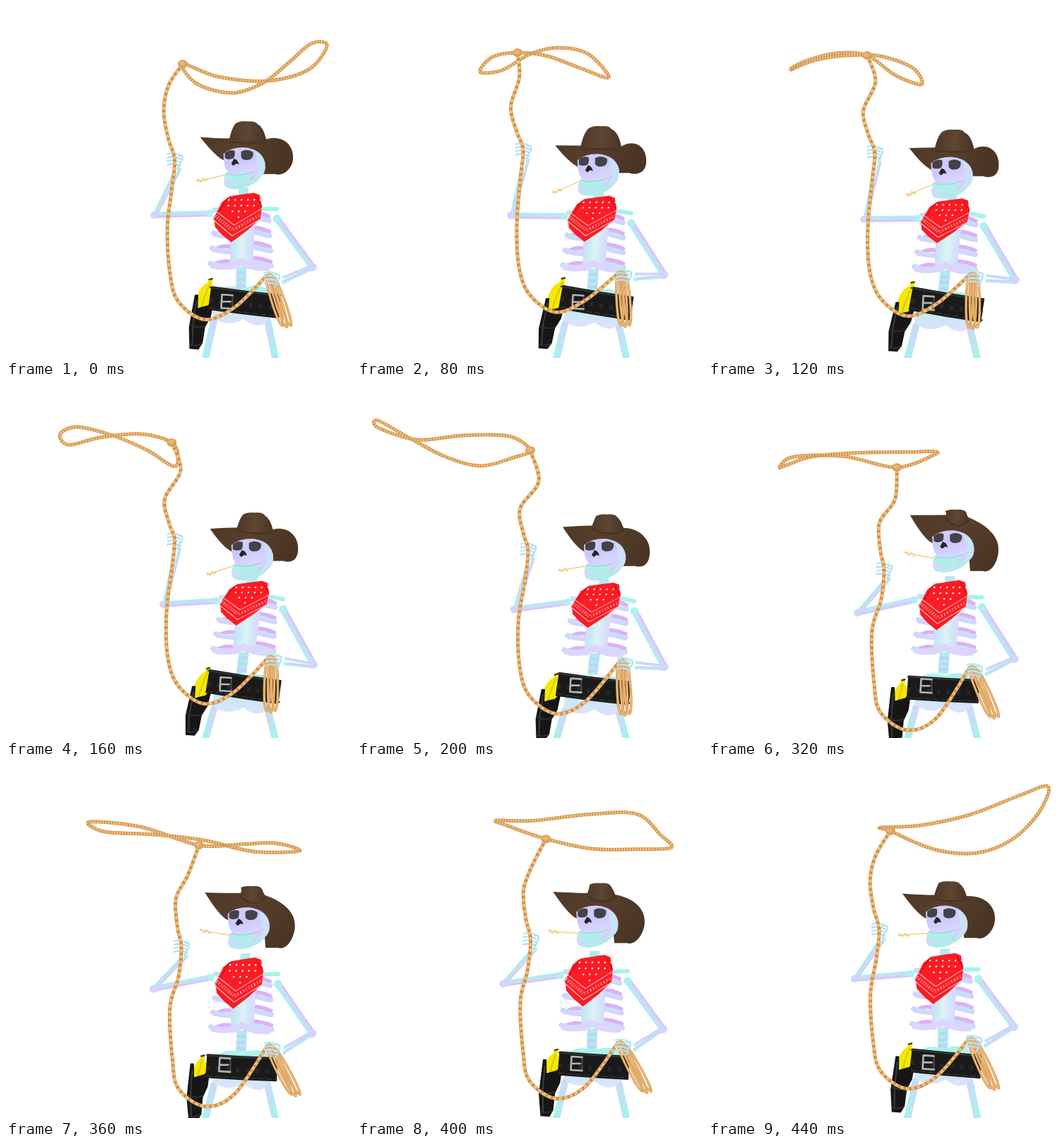
An HTML page with a canvas that plays this animation: 488 px wide and 498 px high, repeating every 0.48 s.

```html
<!DOCTYPE html>
<html lang="en">
<head>
<meta charset="utf-8">
<title>Skeleton cowboy with a lasso</title>
<style>
html, body { margin: 0; width: 100%; height: 100%; overflow: hidden; background: #fff; }
canvas { display: block; }
</style>
</head>
<body>
<canvas id="stage" width="488" height="498"></canvas>
<script>
const ctx = document.getElementById('stage').getContext('2d');
const LOOP = 480, STEP = 40;
const CYAN = '#a4f4ea', LAVENDER = '#d3d5fd', VIOLET = '#dcb0f8';
let t = 0;

// Lasso ring: ten points along the rope, starting at the knot, per key time.
const ringTimes = [0, 80, 120, 200, 280, 360, 440];
const rings = [
  [250,82, 270,110, 320,123, 365,108, 400,80, 432,53, 454,56, 428,90, 370,106, 300,100],
  [227,66, 192,72, 174,93, 205,91, 245,68, 285,59, 327,68, 356,101, 316,88, 270,71],
  [225,70, 180,67, 135,79, 117,90, 150,77, 195,70, 245,71, 290,88, 302,111, 265,98],
  [245,91, 215,71, 150,70, 85,76, 30,59, 30,49, 75,74, 125,100, 175,113, 222,101],
  [258,113, 302,81, 240,77, 150,66, 80,61, 36,82, 45,115, 95,130, 150,121, 205,112],
  [273,112, 330,111, 380,109, 415,120, 350,121, 280,105, 210,97, 140,93, 118,79, 190,86],
  [258,92, 320,118, 380,123, 430,104, 468,66, 481,29, 440,42, 370,69, 300,84, 245,87]
];

const wave = (mean, amp, peak) => mean + amp * Math.cos(2 * Math.PI * (t - peak) / LOOP);
const sway = (x, ax, px, y, ay, py) => [wave(x, ax, px), wave(y, ay, py)];
const add = ([x, y], dx, dy) => [x + dx, y + dy];

// Periodic Hermite interpolation of the ring keys.
function ringAt(time) {
  const n = rings.length;
  const when = k => ringTimes[(k + n) % n] + LOOP * Math.floor(k / n);
  const key = k => rings[(k + n) % n];
  let k = n - 1;
  while (ringTimes[k] > time) k--;
  const span = when(k + 1) - when(k), u = (time - when(k)) / span;
  const values = key(k).map((a, i) => {
    const b = key(k + 1)[i];
    const va = (b - key(k - 1)[i]) / (when(k + 1) - when(k - 1)) * span;
    const vb = (key(k + 2)[i] - a) / (when(k + 2) - when(k)) * span;
    return a + u * (va + u * (3 * (b - a) - 2 * va - vb + u * (2 * (a - b) + va + vb)));
  });
  return Array.from({ length: 10 }, (_, i) => [values[2 * i], values[2 * i + 1]]);
}

function smooth(pts, closed) {
  const n = pts.length;
  const at = i => closed ? pts[(i + n) % n] : pts[Math.max(0, Math.min(n - 1, i))];
  const path = new Path2D();
  path.moveTo(...pts[0]);
  for (let i = 0; i < (closed ? n : n - 1); i++) {
    const [a, b, c, d] = [at(i - 1), at(i), at(i + 1), at(i + 2)];
    path.bezierCurveTo(b[0] + (c[0] - a[0]) / 6, b[1] + (c[1] - a[1]) / 6,
      c[0] - (d[0] - b[0]) / 6, c[1] - (d[1] - b[1]) / 6, ...c);
  }
  return path;
}

function stroke(path, color, width, dash = [], cap = 'round') {
  ctx.strokeStyle = color;
  ctx.lineWidth = width;
  ctx.lineCap = cap;
  ctx.lineJoin = 'round';
  ctx.setLineDash(dash);
  ctx.stroke(typeof path === 'string' ? new Path2D(path) : path);
}

function fill(path, color) {
  ctx.fillStyle = color;
  ctx.fill(typeof path === 'string' ? new Path2D(path) : path);
}

function oval(x, y, rx, ry, color, angle = 0) {
  ctx.beginPath();
  ctx.ellipse(x, y, rx, ry, angle, 0, 7);
  ctx.fillStyle = color;
  ctx.fill();
}

const line = (...pts) => 'M' + pts.map(p => p.join()).join('L');

function gradient(a, b, ...colors) {
  const g = ctx.createLinearGradient(...a, ...b);
  colors.forEach((c, i) => g.addColorStop(i / (colors.length - 1), c));
  return g;
}

// Draws in a space sheared so that (0,0) is the top and (0,height) the bottom.
function between(top, bottom, height, draw) {
  ctx.save();
  ctx.transform(1, 0, (bottom[0] - top[0]) / height, (bottom[1] - top[1]) / height, ...top);
  draw();
  ctx.restore();
}

function bone(a, b, width) {
  const dx = b[0] - a[0], dy = b[1] - a[1], k = width / 2 / Math.hypot(dx, dy);
  const shade = gradient(add(a, dy * k, -dx * k), add(a, -dy * k, dx * k), CYAN, '#c9def8', '#e0b9fb');
  stroke(line(a, b), shade, width);
  oval(...a, width * .62, width * .62, LAVENDER);
  oval(...b, width * .62, width * .62, '#b2eff0');
}

function rope(path, dash, width = 5) {
  stroke(path, '#dc9f57', width);
  stroke(path, '#f0c182', width - 1.5);
  stroke(path, '#c88f4c', width - .5, dash, 'butt');
}

function drawTorso(neck, waist, drop) {
  stroke(`M294 ${445 + drop}L281 503`, gradient([280, 0], [296, 0], CYAN, LAVENDER), 10);
  stroke(`M370 ${445 + drop}L382 503`, gradient([367, 0], [383, 0], LAVENDER, CYAN), 10);
  fill(`M298 ${404 + drop}Q312 ${391 + drop} 334 ${400 + drop}Q358 ${390 + drop} 372 ${403 + drop}L374 ${440 + drop}
    Q360 ${462 + drop} 336 ${443 + drop}Q312 ${456 + drop} 292 ${440 + drop}Z`,
    gradient([0, 395 + drop], [0, 455 + drop], CYAN, '#e2e0ff'));
  between(neck, waist, 120, () => {
    stroke('M0 -6V26', '#b4e9ef', 14, [], 'butt');
    stroke('M0 100V142', '#c5d0fa', 14, [], 'butt');
    stroke('M0 112V142', CYAN, 15, [4, 5], 'butt');
    [38, 60, 82, 104].forEach((r, i) => {
      const out = 39 + i * 1.7;
      stroke(`M${-out + 3} ${r + 3}Q-28 ${r - 5} -16 ${r - 2}`, VIOLET, 6);
      stroke(`M${out - 3} ${r - 2}Q26 ${r - 8} 14 ${r - 8}`, VIOLET, 6);
      stroke(`M${-out} ${r}Q-30 ${r + 6} -12 ${r + 5}`, LAVENDER, 7.5);
      stroke(`M${out - 2} ${r + 4}Q26 ${r + 1} 12 ${r - 3}`, LAVENDER, 7.5);
      stroke(`M${-out + 2} ${r - 2}Q-30 ${r + 4} -14 ${r + 3}`, '#bceaf3', 2);
      stroke(`M${out - 4} ${r + 2}Q26 ${r - 1} 14 ${r - 5}`, '#bceaf3', 2);
    });
    fill('M-18 50H17L16 98Q0 122 -16 102Z', gradient([-17, 0], [17, 0], '#d6d6ff', '#c3eef3', '#e0f3f4', '#d2e6fa', '#dcd6ff'));
    fill('M-45 102Q-18 108 -1 96Q18 108 42 105L40 115Q16 117 0 107Q-20 118 -44 111Z', '#dcd6fd');
  });
}

function drawArms(neck, hand, offHand) {
  const shoulder = sway(296.5, 5.5, 195, 300, 6.5, 230);
  const elbow = sway(214.5, 8, 170, 308.5, 14.5, 278);
  const offShoulder = sway(387.5, 5, 195, 310, 9, 225);
  const offElbow = sway(434, 1, 160, 383, 14.5, 215);

  stroke(line(add(neck, 26, 24), add(offShoulder, 0, -14)), CYAN, 6);
  stroke(line(add(shoulder, 3, -5), add(neck, -20, 26)), '#c9def5', 7);
  bone(elbow, add(shoulder, -4, 0), 8.5);
  bone(add(elbow, 1, -3), add(hand, 0, 16), 3.5);
  bone(add(elbow, 3, -1), add(hand, 7, 14), 4.5);
  bone(offElbow, offShoulder, 9.5);
  bone(add(offElbow, -2, -1), add(offHand, 15, -2), 4);
  bone(add(offElbow, -3, 3), add(offHand, 14, 5), 4.5);
}

function drawHand([x, y]) {
  for (let i = 0; i < 4; i++) {
    const fy = y - 8 + i * 5;
    stroke(`M${x + 8} ${fy + 2}Q${x} ${fy - 3} ${x - 10} ${fy}`, i % 2 ? '#c6d2fa' : CYAN, 2.4);
  }
  stroke(`M${x + 4} ${y + 13}L${x + 11} ${y}L${x + 11} ${y - 5}L${x + 5} ${y - 6}`, '#a9dff0', 2);
}

function drawBelt() {
  const left = sway(285, 3.5, 40, 419, 8, 295), right = sway(386, 3, 80, 430, 5, 230);
  const top = sway(274, 4, 30, 436, 11, 255), bottom = sway(262.5, 3.2, 440, 495.5, 11.5, 285);
  const [sx, sy] = sway(284, 8, 60, 400, 17, 285), [hx, hy] = top;

  fill(`M${sx - 3} ${sy}L${sx + 3} ${sy - 1}L${sx + 2} ${sy + 8}Q${hx + 19} ${hy - 14} ${hx + 8} ${hy + 3}
    L${hx - 9} ${hy}Q${hx - 9} ${sy + 14} ${sx - 4} ${sy + 5}Z`, '#f6e800');
  stroke(`M${sx - 1} ${sy + 7}Q${hx + 4} ${hy - 18} ${hx - 1} ${hy}`, '#d6c908', 2);
  stroke(`M${sx - 2} ${sy + 1}L${sx + 2} ${sy}`, '#4c4608', 2.5);

  between(top, bottom, 62, () => {
    fill('M-14 -17L-9 -17L-6 2L8 -2L15 -12L15 15L10 30L11 53L7 62L-6 61L-13 30Z', '#161616');
    stroke('M-10 -8L-8 26L-3 56', '#3a3a3a', 2);
    stroke('M-11 27Q0 32 9 28M-6 55Q2 58 9 54', '#303030', 2);
  });

  const mid = [(left[0] + right[0]) / 2, (left[1] + right[1]) / 2 + 1];
  const band = (dy, color, width, dash) =>
    stroke(`M${left[0]} ${left[1] + dy}Q${mid[0]} ${mid[1] + dy} ${right[0]} ${right[1] + dy}`, color, width, dash, 'butt');
  band(0, '#1a1a1a', 34);
  band(-15, '#343434', 2);
  band(14, '#2d2d2d', 2, [9, 3]);
  band(3, '#282828', 6, [5, 9]);

  const [bx, by] = sway(310.5, 2.3, 40, 421.5, 3.5, 270);
  stroke(`M${bx + 8} ${by - 8}V${by + 9}`, '#4c4c4c', 2);
  stroke(`M${bx + 8} ${by - 9}L${bx - 7} ${by - 10}L${bx - 8} ${by + 9}L${bx + 8} ${by + 10}M${bx - 7} ${by}H${bx + 5}`, '#b4b4b4', 2.6);
}

function drawBandana() {
  const top = sway(340.5, 6.5, 195, 273.5, 7.3, 235);
  const tip = sway(322.5, 4, 215, 339.5, 6.5, 290);
  between(top, tip, 67, () => {
    const cloth = new Path2D('M-18 3Q0 0 15 -2L24 1L31 17L33 34L18 51L0 67L-15 57L-28 46L-33 33L-27 11Z');
    fill(cloth, '#fb1c24');
    ctx.save();
    ctx.clip(cloth);
    for (let row = 0; row < 4; row++)
      for (let i = row - 3; i <= 3 - row; i++)
        oval(i * 9 + (row % 2) * 1.5, 8 + row * 8, 1.3, 1.3, '#ffe6e6');
    stroke('M-35 22L-2 43L36 17', '#ff9ca0', 1.3);
    stroke('M-34 35L-1 58L37 32', '#ffc4c6', 1.1);
    stroke('M-35 28L-2 50L37 25', '#ff9a9e', 4, [2, 2], 'butt');
    stroke('M-35 28L-2 50L37 25', '#fb1c24', 1.4, [3, 2], 'butt');
    stroke('M-20 5L-28 25M18 2L32 18', '#d60f19', 1.5);
    ctx.restore();
  });
}

function drawHead() {
  const nose = sway(330.5, 7, 230, 226.8, 9.5, 180);
  const tip = sway(283, 8.5, 225, 190, 12, 150), edge = sway(410, 4.2, 215, 226, 11, 245);
  const low = sway(387, 7, 220, 249, 14, 288), crown = sway(347.5, 6.5, 235, 172.5, 9.5, 220);
  const baseL = sway(327, 11, 275, 190, 10.5, 140), baseR = sway(371, 6, 170, 192.5, 10.5, 150);
  const p = (pt, dx = 0, dy = 0) => add(pt, dx, dy).join(' ');

  fill(`M${p(tip)}Q${p(baseL, -18, 0)} ${p(baseL)}L${p(baseR)}
    C${p(edge, -13, -34)} ${p(edge, 1, -17)} ${p(edge)}
    C${p(edge, 0, 14)} ${p(low, 13, 4)} ${p(low)}L${p(low, -18, 0)}L${p(nose, 34, -7)}
    L${p(nose, -16, -2)}Q${p(nose, -28, -8)} ${p(tip)}Z`, gradient(tip, low, '#4f3926', '#573f2c', '#4a3524'));
  fill(`M${p(baseL, -2, 4)}Q${p([baseL[0], crown[1]], 3, 6)} ${p(crown, -15, 2)}Q${p(crown, -8, -1)} ${p(crown)}
    Q${p(crown, 12, -1)} ${p(crown, 15, 4)}Q${p([baseR[0], crown[1]], -3, 8)} ${p(baseR, 1, 2)}
    Q${p(crown, 4, 29)} ${p(baseL, -2, 4)}Z`, gradient(baseL, baseR, '#50392a', '#5e4633', '#4a3424'));
  stroke(`M${p(baseL, 0, 5)}Q${p(crown, 3, 32)} ${p(baseR, 0, 4)}`, '#463121', 2);

  ctx.save();
  ctx.translate(...nose);
  fill('M-16 -11Q-6 -20 13 -20Q38 -18 43 2Q45 16 36 23Q29 33 11 38Q-1 41 -12 37Q-18 31 -14 20L-10 15Q-16 7 -16 -11Z',
    gradient([-8, -20], [12, 38], '#d8cffd', '#cbc8fb', '#d8d6ff', '#a8f0e6'));
  fill('M28 -14Q45 -9 42 11Q38 23 28 26Q36 6 28 -14Z', '#c9e2f7');
  fill('M-14 -12Q-7 -18 0 -15Q1 -6 -3 -4Q-11 -2 -14 -5Z', '#444148');
  fill('M9 -14Q18 -19 26 -13Q27 -6 22 -3Q12 0 9 -6Z', '#444148');
  fill('M-1 -4Q4 -3 6 4L2 3L-2 6L-5 3Z', '#25232c');
  fill('M-13 16Q2 20 19 15L18 25Q1 31 -14 25Z', '#a9f3e6');
  stroke('M-12 17Q2 21 18 17L28 14', '#b6c0ec', 1.3);
  stroke('M21 26Q29 21 33 11', '#dcc3f8', 2);
  ctx.restore();

  const straw = sway(277.5, 8, 210, 250.5, 18, 130), mouth = add(nose, -14, 19);
  stroke(line(straw, mouth), '#f2c677', 1.3);
  for (let i = 0; i < 4; i++) {
    const u = .05 + i * .09;
    const x = straw[0] + u * (mouth[0] - straw[0]), y = straw[1] + u * (mouth[1] - straw[1]);
    oval(x, y + (i % 2 ? 1.4 : -1.4), 2.6, 1, '#f5cd7f', i % 2 ? -.5 : .3);
  }
}

function drawRope(hand, offHand) {
  const ring = ringAt(t), knot = ring[0], sag = wave(460, 27, 310);
  rope(smooth(ring, true), [1.4, 2.4]);

  rope(smooth([
    knot,
    sway(247, 20, 280, 131, 30, 310),
    sway(230, 12.5, 315, 168, 26, 305),
    sway(235, 9, 315, 206, 28, 310),
    hand,
    add(hand, -4, 42),
    sway(229, 3, 340, 328, 20, 300),
    [wave(232, 3.5, 360), sag - 65],
    [244, sag - 25],
    [281, sag],
    [323, sag - 17],
    add(offHand, -10, -4)
  ]), [3.2, 4.8]);
  oval(...knot, 7, 6, '#dba25c');
  oval(knot[0] - 1, knot[1] - 1, 4, 3, '#e8b573');

  const top = add(offHand, -6, -7), end = sway(392, 18, 380, 462, 9, 285);
  for (let i = -1; i < 2; i++) {
    between(add(top, i * 4, Math.abs(i) * 2), add(end, i * 6, -Math.abs(i) * 2), 78, () => {
      const coil = new Path2D();
      coil.ellipse(0, 39, 4.5, 39, 0, 0, 7);
      stroke(coil, '#d0934e', 3.6);
      stroke(coil, '#ebb774', 2.2);
    });
  }
}

function draw() {
  t = Math.floor(performance.now() % LOOP / STEP) * STEP;
  ctx.fillStyle = '#fff';
  ctx.fillRect(0, 0, 488, 498);

  const neck = sway(342, 7, 200, 270.5, 7.5, 245), waist = sway(334, 1.5, 200, 384, 4.5, 240);
  const hand = sway(242, 7, 320, 231.5, 28, 320), offHand = sway(380, 1.5, 200, 392, 10.5, 310);

  drawTorso(neck, waist, wave(7.5, 7.5, 230));
  drawArms(neck, hand, offHand);
  drawBelt();
  drawBandana();
  drawHead();
  drawHand(hand);
  drawRope(hand, offHand);
  drawHand(add(offHand, -3, 0));
  requestAnimationFrame(draw);
}
draw();
</script>
</body>
</html>
```
